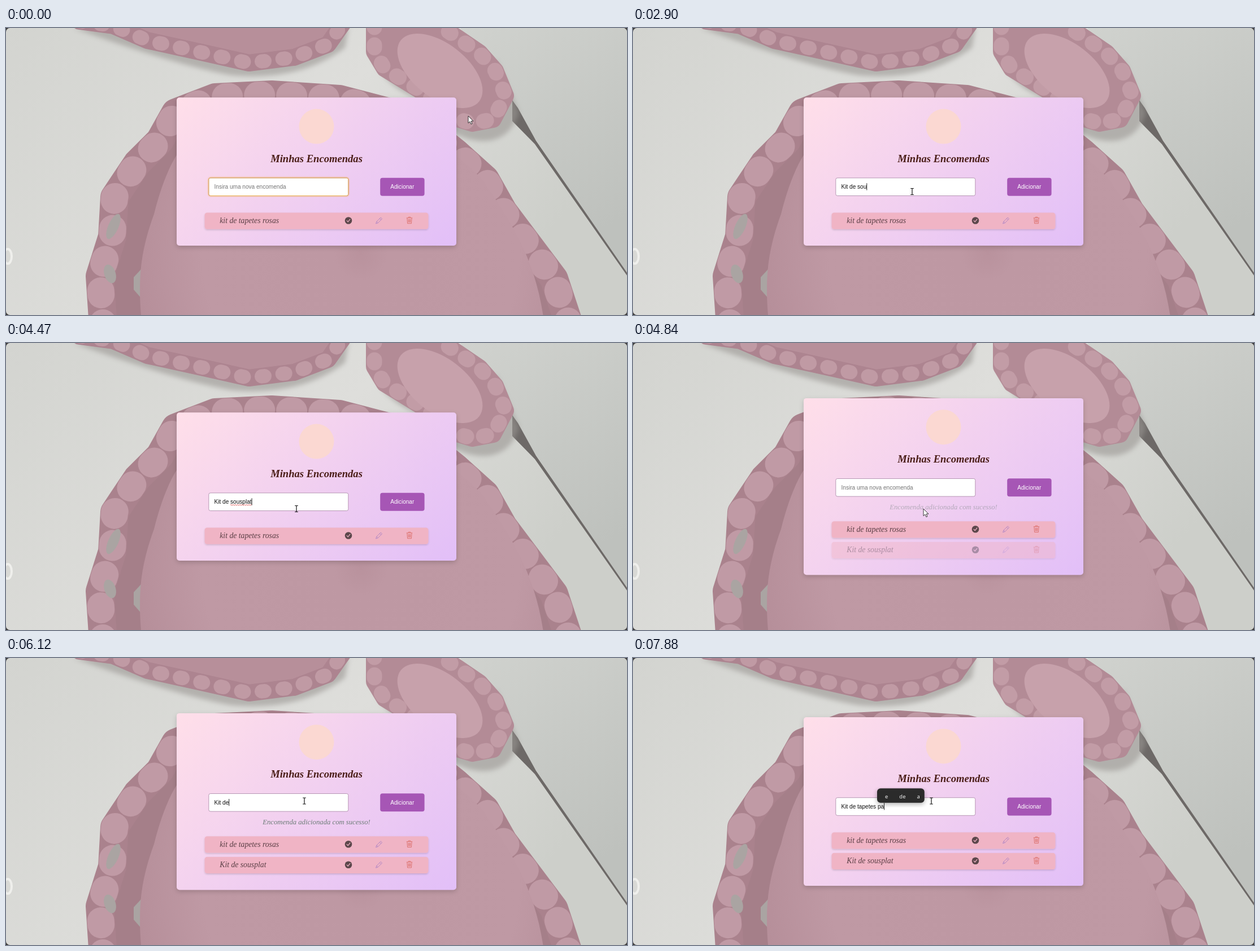
An HTML page that plays this animation: 1099 px wide and 509 px high, repeating every 7990 ms.

```html
<!DOCTYPE html>
<html lang="pt-BR">
<head>
<meta charset="utf-8">
<title>Minhas Encomendas</title>
<style>
  html, body { margin: 0; width: 100%; height: 100%; overflow: hidden; background: #3a3838; }
  svg { display: block; width: 100%; height: 100%; }
  text { white-space: pre; }
  .serif { font-family: "Liberation Serif", serif; font-style: italic; }
  .sans { font: 10.08px "Liberation Sans", Arial, sans-serif; }
  .hint { font: 9.5px "Open Sans", sans-serif; fill: #fff; }
  .loops { fill: none; stroke-linecap: round; stroke-linejoin: round; }
</style>
</head>
<body>
<svg viewBox="0 0 1099 509" preserveAspectRatio="none">
  <defs>
    <clipPath id="stage"><rect width="1099" height="509" rx="7"/></clipPath>
    <linearGradient id="floor" x2="1" y2=".4">
      <stop stop-color="#d3d4d0"/><stop offset=".55" stop-color="#dededb"/><stop offset="1" stop-color="#cdcfca"/>
    </linearGradient>
    <linearGradient id="side" x2=".4" y2="1">
      <stop stop-color="#d0d2ce"/><stop offset="1" stop-color="#bec1bd"/>
    </linearGradient>
    <radialGradient id="wool" gradientUnits="userSpaceOnUse" cx="628" cy="400" r="400">
      <stop stop-color="#b9929d"/><stop offset=".12" stop-color="#be98a3"/>
      <stop offset=".7" stop-color="#bf99a4"/><stop offset="1" stop-color="#b68f9a"/>
    </radialGradient>
    <linearGradient id="card" gradientUnits="userSpaceOnUse">
      <stop stop-color="#ffdfe9"/><stop offset="1" stop-color="#e2bff8"/>
    </linearGradient>
    <filter id="soft" x="-20%" y="-20%" width="140%" height="140%"><feGaussianBlur stdDeviation="4"/></filter>
    <filter id="cardShade" x="-5%" y="-5%" width="110%" height="115%">
      <feDropShadow dx="0" dy="3" stdDeviation="4" flood-opacity=".18"/>
    </filter>
    <filter id="rowShade" x="-5%" y="-30%" width="110%" height="180%">
      <feDropShadow dx="0" dy="1.5" stdDeviation="1.8" flood-opacity=".16"/>
    </filter>
    <filter id="glow" x="-5%" y="-30%" width="110%" height="160%"><feGaussianBlur stdDeviation="1.3"/></filter>
    <path id="rimA" d="M130 -12L190 -4 250 22 350 44 430 62 510 52 570 29 596 -8"/>
    <path id="rimB" d="M652 -6L652 42 670 72 735 112 795 160 825 169 862 162 884 120 866 76 838 44 800 18 765 -6"/>
    <path id="rimC" d="M172 530L166 440 188 370 192 300 232 240 272 200 300 150 370 123 470 118 590 126 720 160 797 222
      848 268 880 325 925 385 970 445 998 530"/>
    <g id="row">
      <rect x="351.5" width="396" height="29.3" rx="4.5" fill="#f0b4c5" filter="url(#rowShade)"/>
      <circle cx="606" cy="14" r="6.3" fill="#5c474b"/>
      <path d="M603.2 14.2l2 2.1 3.7-4.6" fill="none" stroke="#f0b4c5" stroke-width="1.2" stroke-linecap="round"/>
      <path d="M654.6 19.5l1.3-3.7 7.3-7.3 2.4 2.4-7.3 7.3zM661.3 10.4l2.4 2.4M655.9 15.8l2.4 2.4"
        fill="none" stroke="#b187c4" stroke-width=".95" stroke-linejoin="round"/>
      <path d="M708.8 9.4h10.4M712.2 9.2v-1.4h3.6v1.4M709.9 9.6l.7 9.6h6.8l.7-9.6M712.2 11.5l.2 5.8M714 11.5v5.8M715.8 11.5l-.2 5.8"
        fill="none" stroke="#dd716d" stroke-width=".95" stroke-linejoin="round"/>
    </g>
  </defs>

  <g clip-path="url(#stage)">
    <rect width="1099" height="509" fill="url(#floor)"/>
    <path d="M804 0H1099V438Z" fill="url(#side)"/>
    <path d="M896 128L906 142 938 200 1099 434V439L936 206 896 165Z" fill="#6d6967"/>
    <ellipse cx="3" cy="405" rx="7" ry="13" fill="none" stroke="#efefec" stroke-width="4"/>

    <g fill="#9a9693" opacity=".6" filter="url(#soft)">
      <path d="M120 0Q300 66 400 84Q520 95 600 35L606 0Z"/>
      <path d="M640 30Q660 100 730 126Q780 195 835 200Q890 205 908 150L870 60Z"/>
    </g>

    <use href="#rimA" class="loops" stroke="#ad8490" stroke-width="30" style="fill:#b78f9a"/>
    <use href="#rimA" class="loops" stroke="#c09aa4" stroke-width="25" stroke-dasharray="5 32"/>

    <use href="#rimB" class="loops" stroke="#b38b96" stroke-width="30" style="fill:#b38b96"/>
    <use href="#rimB" class="loops" stroke="#c29ca6" stroke-width="27" stroke-dasharray="5 31"/>
    <ellipse cx="768" cy="76" rx="88" ry="48" transform="rotate(38 768 76)" fill="#c7a1ab"/>

    <use href="#rimC" class="loops" stroke="#aa828d" stroke-width="50" style="fill:#a57f89"/>
    <use href="#rimC" class="loops" stroke="#c09aa5" stroke-width="48" stroke-dasharray="7 50"/>
    <g fill="#aaa4a2">
      <ellipse cx="190" cy="352" rx="9" ry="24" transform="rotate(24 190 352)"/>
      <ellipse cx="184" cy="436" rx="10" ry="17" transform="rotate(-18 184 436)"/>
      <path d="M226 442L239 428 240 480 226 464Z"/>
    </g>
    <path d="M240 520C232 440 240 390 262 330C290 220 330 150 470 132C640 126 770 190 842 268C892 340 938 410 952 520Z" fill="url(#wool)"/>
  </g>

  <g id="panel">
    <rect id="cardBox" x="302" width="495" rx="5" fill="url(#card)" filter="url(#cardShade)"/>
    <circle cx="549.5" cy="51.3" r="31" fill="#fbd8d2"/>
    <text class="serif" x="549.5" y="114.6" text-anchor="middle" font-size="18.6" font-weight="700" fill="#4a1d17">Minhas Encomendas</text>
    <rect id="halo" x="358.8" y="142.6" width="247" height="31.6" rx="3.5" fill="none" stroke="#f0b04a" stroke-width="2.2" filter="url(#glow)"/>
    <rect id="field" x="358.8" y="142.6" width="247" height="31.6" rx="3" fill="#fff" stroke="#b08fae" stroke-width=".9"/>
    <rect id="ring" x="358.8" y="142.6" width="247" height="31.6" rx="3" fill="none" stroke="#e9b25c"/>
    <text id="typed" class="sans" x="368.5" y="161.8"/>
    <path id="wavy" fill="none" stroke="#e0524f" stroke-width=".9"/>
    <rect id="caret" y="152" width=".9" height="12.4" fill="#111"/>
    <rect x="662.2" y="142.4" width="78.4" height="32" rx="4" fill="#a656b5"/>
    <text class="sans" x="701.3" y="161.8" text-anchor="middle" fill="#fff">Adicionar</text>
    <text id="notice" class="serif" x="549.5" y="197" text-anchor="middle" font-size="12.7" fill="#6d7d78">Encomenda adicionada com sucesso!</text>
    <g id="list" class="serif" font-size="13.7" fill="#5a3f45">
      <g><use href="#row"/><text x="378.3" y="18.6">kit de tapetes rosas</text></g>
      <g id="added" transform="translate(0 36.4)"><use href="#row"/><text x="378.3" y="18.6">Kit de sousplat</text></g>
    </g>
    <g id="hints">
      <rect id="hintShade" y="129" height="25.5" rx="6" opacity=".3" filter="url(#soft)"/>
      <rect id="hintBox" y="126.2" height="25.4" rx="6" fill="#2b2b2b"/>
      <text class="hint" y="143.6"/><text class="hint" y="143.6"/><text class="hint" y="143.6"/>
    </g>
  </g>

  <path id="arrow" d="M0 0V12.6L2.9 9.9 4.9 14.5 7 13.6 5 9.1H9Z" fill="#fff" stroke="#222" stroke-width=".9" stroke-linejoin="round"/>
  <path id="beam" d="M-2.8 -5.5H-.7Q0 -5.5 0 -4.7 0 -5.5 .7 -5.5H2.8M0 -4.7V4.7M-2.8 5.5H-.7Q0 5.5 0 4.7 0 5.5 .7 5.5H2.8"
    fill="none" stroke="#111" stroke-width="1.2"/>
</svg>

<script>
const LOOP = 7990, TEXT_X = 368.5;
const SENT = 4730, NOTICE_END = 6230;
const $ = id => document.getElementById(id);
const set = (el, attrs) => { for (const k in attrs) el.setAttribute(k, attrs[k]); };
const show = (el, on) => el.setAttribute("visibility", on ? "visible" : "hidden");
const within = (t, a, b) => t >= a && t < b;
const ramp = (t, a, b) => Math.min(1, Math.max(0, (t - a) / (b - a)));
const ease = p => p * p * (3 - 2 * p);
const mix = (a, b, p) => a + (b - a) * p;

const pen = document.createElement("canvas").getContext("2d");
function widthOf(text, font) {
  pen.font = font;
  return pen.measureText(text).width;
}
const SANS = '10.08px "Liberation Sans", Arial, sans-serif';
const HINT = '9.5px "Open Sans", sans-serif';

// Each run types one character per listed time after the given prefix.
const runs = [
  { from: 2090, to: SENT, prefix: "", text: "Kit de sousplat",
    keys: [2090, 2310, 2390, 2450, 2540, 2600, 2680, 2750, 2830, 2890, 2970, 3300, 3670, 3760, 3830] },
  { from: 5390, to: 7080, prefix: "", text: "Kit de ",
    keys: [5390, 5740, 5830, 5910, 5990, 6070, 6150] },
  { from: 7080, to: LOOP, prefix: "Kit de ", text: "tapetes pa",
    keys: [7080, 7150, 7230, 7310, 7390, 7470, 7560, 7640, 7770, 7880] }
];

const popups = [
  [2240, 2450, 374.6, "Kilva", "Kivena", "Kit"],
  [2680, 2830, 397.5, "festa", "cozinha", "café"],
  [3080, 3300, 408, "sousplats", "soubera", "soube"],
  [3670, 3960, 421, "placa", "plano", "plantas"],
  [5610, 5870, 374.6, "Kilva", "Kivena", "Kit"],
  [6310, 7230, 397.5, "entrada", "entrada e", "café"],
  [7230, 7560, 408, "tapetes", "tapete", "tapa"],
  [7690, LOOP, 432, "e", "de", "a"]
];

const caretOff = [[0, 2090], [4140, 4360], [SENT, 5390], [6490, 6780]];

function typedAt(t) {
  const run = runs.find(r => within(t, r.from, r.to));
  return run ? run.prefix + run.text.slice(0, run.keys.filter(k => k <= t).length) : "";
}

function pointerAt(t) {
  if (t < 2020) {
    const p = ease(ramp(t, 1260, 2020)), q = 1 - p;
    const curve = (a, b, c, d) => a * q * q * q + 3 * b * p * q * q + 3 * c * p * p * q + d * p * p * p;
    return [curve(818, 760, 600, 494), curve(156, 372, 352, 290)];
  }
  const a = ease(ramp(t, 4340, 4470)), b = ease(ramp(t, 5300, 5430));
  return [494 + 20 * a + 14 * b, mix(290 + 4 * a, 253.5, b)];
}

function drawCard(t) {
  const notice = within(t, SENT, NOTICE_END);
  const h = t < SENT ? 262.6 : notice ? 313.4 : 299;
  const top = 254.6 - h / 2, reach = (495 + h) / 4;
  const fade = t < SENT ? 0 : ramp(t, SENT - 40, 5020);
  set($("panel"), { transform: `translate(0 ${top})` });
  set($("cardBox"), { height: h });
  set($("card"), { x1: 549.5 - reach, y1: h / 2 - reach, x2: 549.5 + reach, y2: h / 2 + reach });
  set($("list"), { transform: `translate(0 ${notice ? 218.4 : 204.2})` });
  set($("added"), { opacity: fade });
  set($("notice"), { opacity: notice ? fade : 0 });
  const focus = 1 - ramp(t, 1700, 1950);
  set($("halo"), { opacity: focus * .8 });
  set($("ring"), { opacity: focus });
  return top;
}

function drawField(t) {
  const text = typedAt(t), el = $("typed");
  el.textContent = text || "Insira uma nova encomenda";
  set(el, { fill: text ? "#111" : "#757575" });
  set($("caret"), { x: TEXT_X + widthOf(text, SANS) });
  show($("caret"), !caretOff.some(([a, b]) => within(t, a, b)));
  show($("wavy"), within(t, 4360, SENT));
}

function drawPopup(t) {
  const popup = popups.find(p => within(t, p[0], p[1]));
  show($("hints"), popup);
  if (!popup) return 0;
  const [, , left, ...words] = popup;
  let x = left + 14;
  $("hints").querySelectorAll("text").forEach((el, i) => {
    el.textContent = words[i];
    set(el, { x });
    x += widthOf(words[i], HINT) + 20;
  });
  const right = x - 12;
  for (const id of ["hintBox", "hintShade"]) set($(id), { x: left, width: right - left });
  return right;
}

function drawPointer(t, top, popupRight) {
  const [x, y] = pointerAt(t), dy = y - top;
  const inField = x > 359 && x < 606 && dy > 142 && dy < 174;
  const onPopup = x < popupRight && dy > 126 && dy < 152;
  const beam = inField && !onPopup;
  const shift = onPopup ? -2 : 0;
  show($("beam"), beam);
  show($("arrow"), !beam);
  set($("beam"), { transform: `translate(${x} ${y})` });
  set($("arrow"), { transform: `translate(${x + shift} ${y + shift / 2})` });
}

function draw(t) {
  const top = drawCard(t);
  drawField(t);
  drawPointer(t, top, drawPopup(t));
}

set($("wavy"), { d: "M397 164" + "q1 -1.6 2 0t2 0".repeat(9) + "q1 -1.6 2 0" });

const start = performance.now();
function tick() {
  draw((performance.now() - start) % LOOP);
  requestAnimationFrame(tick);
}
tick();
</script>
</body>
</html>
```
